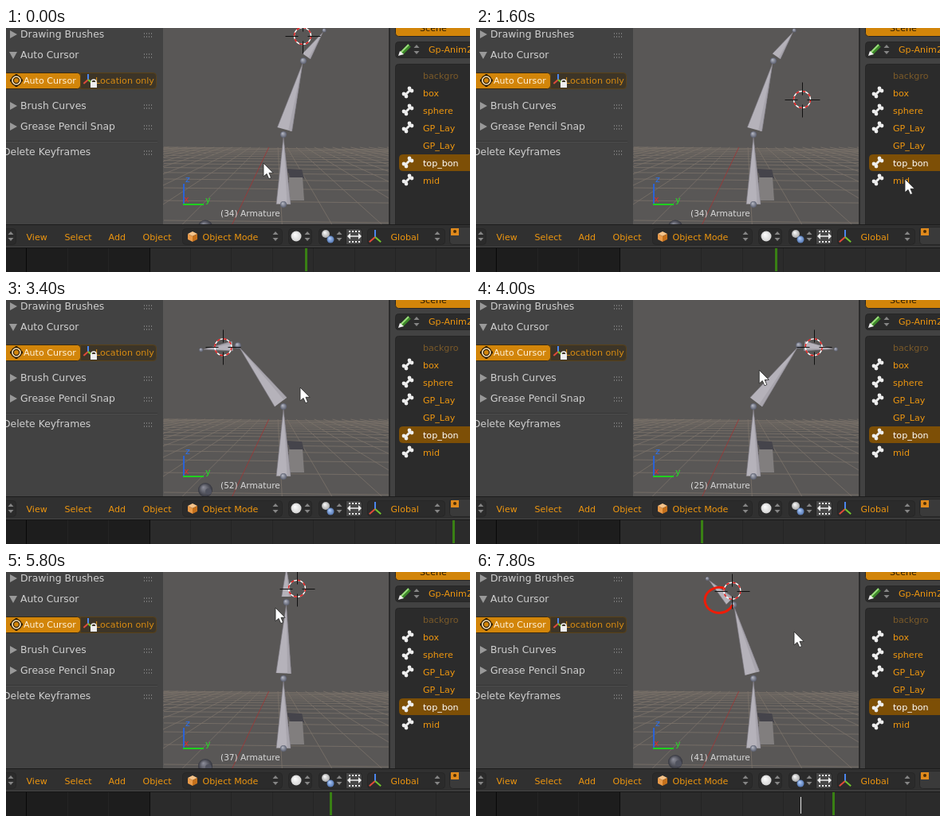
Recreate the animation shown at these times as an HTML page with a canvas. Size 582x307 px, loop 8000 ms.

```html
<!DOCTYPE html>
<html lang="en">
<head>
<meta charset="utf-8">
<title>Armature animation</title>
<style>
html, body { margin: 0; width: 100%; height: 100%; overflow: hidden; background: #424242; }
canvas { display: block; }
</style>
</head>
<body>
<canvas id="stage" width="582" height="307"></canvas>
<script>
const ctx = document.getElementById('stage').getContext('2d');
const LOOP = 8000, STEP = 200;
const ORANGE = '#ee960f', SELECTED = '#d2850a', FIELD = '#2b2b2b';
const LOOP_START = -.4, LOOP_SWEEP = 4.63;

const clamp01 = v => Math.min(1, Math.max(0, v));
const frameX = f => Math.round(376 + (f - 34) * 10.28);
const drawn = t => clamp01((t - 6200) / 800);

function frameAt(t) {
  if (t < 2600) return 34;
  if (t < 3600) return Math.round(34 + (t - 2600) * .0225);
  if (t < 7400) return Math.min(37, Math.round(15 + (t - 3600) * .025));
  return 37 + Math.floor((t - 7200) / 150);
}

// Half a swing from right (1) to left (-1).
const swing = (f, first) => Math.cos(Math.PI * clamp01((f - first) / 26));

function poseAt(f) {
  const lean = .646 * swing(f, 24.5), top = 1.69 * swing(f, 24);
  const along = (x, y, angle, length) => [x + Math.sin(angle) * length, y - Math.cos(angle) * length];
  const joint = along(348, 133, lean, 95);
  return { joint, top, tip: along(...joint, top, 46.5), target: along(...joint, top, 18.6) };
}

// time, x, y of the places where the pointer turns
const stops = [
  [0, 323, 170], [600, 409, 90], [1600, 538, 190], [2600, 399, 68], [3400, 369, 110],
  [4400, 352, 83], [4800, 352, 35], [5800, 338, 45], [7000, 350, 39], [7800, 399, 75]
];

function pointerAt(t) {
  if (t >= 6200 && t < 7000) {
    const a = LOOP_START - LOOP_SWEEP * drawn(t);
    return [341 + 17 * Math.cos(a), 20 + 18 * Math.sin(a)];
  }
  const i = Math.max(1, stops.findIndex(s => s[0] >= t));
  const [t0, x0, y0] = stops[i - 1], [t1, x1, y1] = stops[i];
  const u = Math.sin(clamp01((t - t0) / (t1 - t0)) * Math.PI / 2);
  return [x0 + (x1 - x0) * u, y0 + (y1 - y0) * u];
}

function rect(x, y, w, h, color) {
  ctx.fillStyle = color;
  ctx.fillRect(x, y, w, h);
}

function shape(color, ...pts) {
  ctx.beginPath();
  for (let i = 0; i < pts.length; i += 2) ctx.lineTo(pts[i], pts[i + 1]);
  ctx.closePath();
  ctx.fillStyle = color;
  ctx.fill();
}

function line(color, width, ...pts) {
  ctx.beginPath();
  for (let i = 0; i < pts.length; i += 2) ctx.lineTo(pts[i], pts[i + 1]);
  ctx.strokeStyle = color;
  ctx.lineWidth = width;
  ctx.stroke();
}

function disc(x, y, r, color) {
  ctx.beginPath();
  ctx.arc(x, y, r, 0, 7);
  ctx.fillStyle = color;
  ctx.fill();
}

function ring(x, y, r, color, width, end = 7) {
  ctx.beginPath();
  ctx.arc(x, y, r, 0, end, end < 0);
  ctx.strokeStyle = color;
  ctx.lineWidth = width;
  ctx.stroke();
}

function ball(x, y, r, light = '#b9bcc8', dark = '#5c6070') {
  const g = ctx.createRadialGradient(x - r * .3, y - r * .4, 0, x, y, r);
  g.addColorStop(0, light);
  g.addColorStop(1, dark);
  disc(x, y, r, g);
}

function button(x, y, w, h, fill, edge = '#262626', radii = 4) {
  ctx.beginPath();
  ctx.roundRect(x + .5, y + .5, w - 1, h - 1, radii);
  ctx.fillStyle = fill;
  ctx.fill();
  ctx.strokeStyle = edge;
  ctx.lineWidth = 1;
  ctx.stroke();
}

function text(str, x, y, color = ORANGE, size = 11.1) {
  ctx.font = size + 'px "DejaVu Sans", sans-serif';
  ctx.fillStyle = color;
  ctx.fillText(str, x, y + 4);
}

function arrows(x, y) {
  for (const s of [-1, 1]) shape('#858585', x - 3.5, y + 2 * s, x, y + 6 * s, x + 3.5, y + 2 * s);
}

function triad(x, y, s) {
  line('#4b86ee', 2, x, y, x, y - s);
  line('#e04a3a', 2, x, y, x - s * .8, y + s * .7);
  line('#72c52e', 2, x, y, x + s * .8, y + s * .7);
}

function toolPanel() {
  rect(0, 0, 197, 248, '#424242');
  rect(0, 142, 190, 1, '#363636');
  rect(0, 143, 190, 1, '#4d4d4d');
  const title = (str, y, x = 18) => {
    text(str, x, y, '#cfcfcf', 12.4);
    for (let i = 0; i < 8; i++) rect(173 + i % 4 * 3, y - 2 + (i >> 2) * 4, 1, 2, '#777');
  };
  title('Drawing Brushes', 8);
  title('Auto Cursor', 34);
  title('Brush Curves', 98);
  title('Grease Pencil Snap', 124);
  title('Delete Keyframes', 156, -4);
  for (const y of [8, 98, 124]) shape('#999', 5, y - 5, 14, y, 5, y + 5);
  shape('#999', 4, 30, 14, 30, 9, 39);

  button(-4, 56, 98, 21, SELECTED, '#3a2a10');
  button(93, 56, 96, 21, '#3d3527', '#5a4218', [0, 4, 4, 0]);
  text('Auto Cursor', 22, 66, '#fff3dc');
  text('Location only', 112, 66, '#d98c12');
  ring(13, 66, 5, '#2b1c04', 4);
  for (const [dx, dy] of [[1, 0], [-1, 0], [0, 1], [0, -1]])
    line('#2b1c04', 3, 13 + dx * 5, 66 + dy * 5, 13 + dx * 8, 66 + dy * 8);
  ring(13, 66, 5, '#ffe9c0', 1.6);
  triad(103, 65, 7);
  ring(110, 68, 3, '#eee', 1.5, -Math.PI);
  rect(106, 68, 8, 7, '#eee');
}

// Perspective floor: cells shrink toward a vanishing point.
function floor() {
  const vx = 340, vy = 129, color = '#7b736a';
  for (let i = 0; i < 16; i++) {
    const y = vy + 114 / (1 + .28 * i);
    line(color, .8, 198, y - 1, 480, y + 2);
  }
  for (let k = -16; k <= 16; k++) {
    const dx = -54 + k * 60;
    line(k ? color : '#a33434', .8, vx + dx * .19, 150, vx + dx * 1.05, 248);
  }
}

function bone(x1, y1, x2, y2, half, ratio) {
  const dx = x2 - x1, dy = y2 - y1, n = Math.hypot(dx, dy);
  const wx = x1 + dx * ratio, wy = y1 + dy * ratio, px = -dy / n * half, py = dx / n * half;
  const ex = x2 - dx / n * 3, ey = y2 - dy / n * 3;
  shape('#b5b2ba', wx - px, wy - py, ex, ey, wx + px, wy + py);
  shape('#a8a5ad', wx + px * .5, wy + py * .5, ex, ey, wx + px, wy + py);
  line('#77747c', .6, wx - px, wy - py, ex, ey, wx + px, wy + py);
}

function cursor3d(x, y) {
  ring(x, y, 10.5, '#fff', 1.3);
  ctx.setLineDash([4.12, 4.12]);
  ring(x, y, 10.5, '#e01818', 1.5, Math.PI * 2);
  ctx.setLineDash([]);
  x = Math.round(x) + .5;
  y = Math.round(y) + .5;
  for (const s of [-1, 1]) {
    line('#111', 1, x + 6 * s, y, x + 22 * s, y);
    line('#111', 1, x, y + 6 * s, x, y + 22 * s);
  }
}

function redStroke(joint, angle, progress) {
  ctx.save();
  ctx.translate(...joint);
  ctx.rotate(angle + .78);
  ctx.beginPath();
  ctx.ellipse(-18, -6, 18, 16, 0, -1.2, -1.2 - LOOP_SWEEP * progress, true);
  ctx.strokeStyle = '#ee1c08';
  ctx.lineWidth = 3;
  ctx.lineCap = 'round';
  ctx.stroke();
  ctx.restore();
}

function viewport(t, f) {
  const { joint, tip, top } = poseAt(f);
  ctx.save();
  ctx.beginPath();
  ctx.rect(197, 0, 283, 248);
  ctx.clip();
  rect(197, 0, 283, 248, '#595756');
  floor();
  shape('#45444b', 352, 177, 371, 178, 374, 189, 357, 189);
  shape('#817e7e', 355, 188, 372, 188, 374, 217, 355, 217);
  const ballY = Math.max(239, 244 + 18 * swing(f, 24));
  ball(250, ballY, 9, '#8e8f9b', '#34353d');
  disc(254, ballY + 2, 4, '#50525e');

  bone(348, 222, 348, 134, 9, .005);
  ball(348, 222, 4);
  bone(348, 133, ...joint, 9.5, .06);
  ball(348, 134, 4);
  bone(...joint, ...tip, 6, .15);
  ball(...joint, 4);
  ball(...tip, 2.5);
  if (t > 6200) redStroke(joint, top, drawn(t));

  if (t < 600) cursor3d(372, 10);
  else if (t < 2000) cursor3d(409, 90);
  else cursor3d(...poseAt(f - 1.2).target);

  line('#2a62d8', 2, 223, 221, 223, 196);
  line('#1fd01f', 2, 222, 222, 248, 222);
  text('z', 225, 190, '#2a70f0');
  text('y', 250, 216, '#25dd25');
  text('x', 223, 215, '#d83030');
  text(`(${f}) Armature`, 269, 233, t > 6200 && f === 37 ? '#fff' : '#dadada', 10.6);
  ctx.restore();
}

function boneIcon(x, y) {
  line('#eee', 3, x - 4, y + 4, x + 4, y - 4);
  for (const s of [-1, 1]) {
    disc(x + 5 * s, y - 2 * s, 2.4, '#eee');
    disc(x + 2 * s, y - 5 * s, 2.4, '#eee');
  }
}

function listPanel() {
  rect(480, 0, 102, 248, '#424242');
  rect(480, 0, 2, 248, FIELD);
  button(488, -8, 110, 19, SELECTED);
  text('Scene', 519, 0, '#2b1c04');
  button(488, 17, 110, 21, FIELD);
  line('#3d8a2a', 5, 496, 32, 506, 22);
  line('#9bdc7c', 2, 495, 31, 505, 21);
  shape('#eee', 492, 35, 494, 29, 499, 33);
  arrows(515, 27);
  text('Gp-Anim2', 530, 27);
  button(488, 45, 110, 215, FIELD);
  button(493, 159, 110, 21, '#7d4f06', '#7d4f06');
  ['backgro', 'box', 'sphere', 'GP_Lay', 'GP_Lay', 'top_bon', 'mid'].forEach((name, i) => {
    const y = 60 + i * 22;
    text(name, 523, y, i === 0 ? '#7b5a29' : i === 5 ? '#fff' : ORANGE);
    if (i && i !== 4) boneIcon(504, y - 1);
  });
}

function header() {
  rect(0, 247, 582, 29, '#303030');
  rect(0, 247, 582, 1, '#1c1c1c');
  for (const [x, w] of [[-5, 18], [221, 126], [354, 30], [392, 55], [453, 98]]) button(x, 252, w, 21, FIELD);
  for (const x of [6, 338, 378, 418, 541]) arrows(x, 262);
  for (const [name, x] of [['View', 25], ['Select', 73], ['Add', 128], ['Object', 171], ['Object Mode', 246], ['Global', 482]])
    text(name, x + .5, 263);
  shape('#f6c48a', 228, 259, 234, 256, 240, 259, 234, 262);
  shape('#e99a48', 228, 259, 234, 262, 234, 269, 228, 266);
  shape('#c4701c', 240, 259, 234, 262, 234, 269, 240, 266);
  ball(364, 262, 6.5, '#fff', '#d4d4d4');
  ball(401, 259, 5, '#fff', '#aaa');
  ball(407, 266, 4.5, '#b8d4ff', '#5579b5');
  button(426, 252, 21, 21, '#484848', '#262626', [0, 4, 4, 0]);
  line('#eee', 1.5, 430, 262, 444, 262);
  for (const s of [-1, 1]) shape('#eee', 437 + 9 * s, 262, 437 + 5 * s, 258, 437 + 5 * s, 266);
  for (let i = 0; i < 8; i++) rect(430 + i % 4 * 4, i < 4 ? 255 : 268, 2, 2, '#eee');
  triad(463, 263, 9);
  button(556, 250, 40, 23, '#3a3a3a');
  rect(558, 252, 10, 9, '#e08a1c');
  disc(563, 256, 2, '#4a2c05');
}

function timeline(t, f) {
  rect(0, 276, 582, 31, '#2b2b2b');
  rect(0, 276, 180, 31, '#1d1d1d');
  rect(0, 275, 582, 1, '#484848');
  rect(0, 276, 582, 1, '#151515');
  for (let n = 0; n < 60; n += 5) rect(frameX(n) - 1, 277, 1, 30, n ? '#242424' : '#080808');
  rect(180, 277, 1, 30, '#0d0d0d');
  if (t > 6200) rect(frameX(37), 283, 1, 21, '#e6e6e6');
  rect(frameX(f) - 1, 277, 3, 29, '#398014');
}

function mouse(x, y) {
  ctx.save();
  ctx.translate(x, y);
  ctx.scale(1.12, 1.12);
  shape('#fff', 0, 0, 0, 15, 3.6, 12, 6, 17.5, 8.5, 16.5, 6.2, 11, 10.8, 11);
  ctx.strokeStyle = '#222';
  ctx.lineWidth = .7;
  ctx.stroke();
  ctx.restore();
}

function draw(time) {
  const t = Math.floor(time % LOOP / STEP) * STEP;
  const f = frameAt(t);
  toolPanel();
  viewport(t, f);
  listPanel();
  header();
  timeline(t, f);
  mouse(...pointerAt(t));
}

const start = performance.now();
function tick() {
  draw(performance.now() - start);
  requestAnimationFrame(tick);
}
tick();
</script>
</body>
</html>
```
